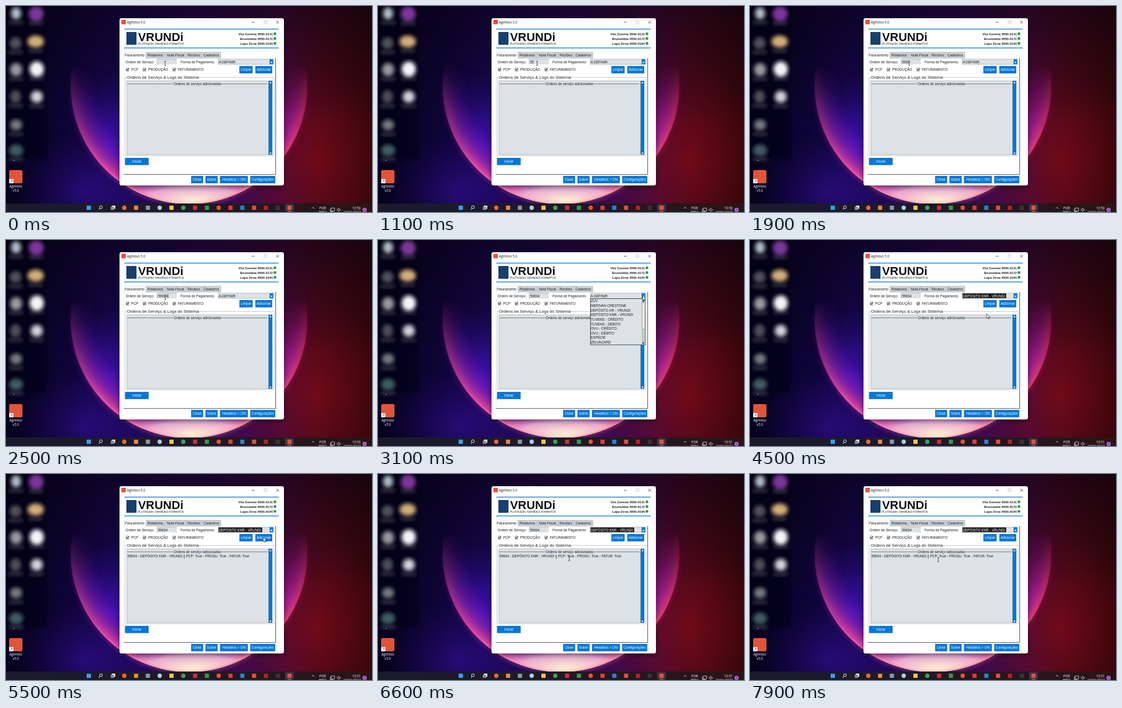
An HTML page that plays this animation: 690x388 px, repeating every 8000 ms.

```html
<!DOCTYPE html>
<html lang="pt-BR">
<head>
<meta charset="utf-8">
<title>Faturamento</title>
<style>
html, body { margin: 0; width: 100%; height: 100%; overflow: hidden; background: #06021a; }
svg { display: block; width: 690px; height: 388px; }
text { font-family: "Liberation Sans", Arial, sans-serif; font-size: 6.5px; fill: #1c1c1c; white-space: pre; }
.ui { font-family: "Open Sans", "Noto Sans", sans-serif; font-size: 6.2px; }
.light { fill: #fff; }
.mid { text-anchor: middle; }
.end { text-anchor: end; }
.bold { font-weight: bold; }
</style>
</head>
<body>
<svg id="stage" viewBox="0 0 690 388" xmlns="http://www.w3.org/2000/svg">
  <defs>
    <linearGradient id="sky">
      <stop offset="0" stop-color="#06021c"/><stop offset=".17" stop-color="#0d0436"/>
      <stop offset=".3" stop-color="#180650"/><stop offset=".55" stop-color="#34085a"/>
      <stop offset=".76" stop-color="#4e0a3a"/><stop offset=".86" stop-color="#4e0818"/>
      <stop offset="1" stop-color="#340608"/>
    </linearGradient>
    <linearGradient id="shade" x2="0" y2="1">
      <stop offset="0" stop-color="#06020f" stop-opacity=".6"/>
      <stop offset=".55" stop-color="#06020f" stop-opacity="0"/>
    </linearGradient>
    <linearGradient id="rim" gradientUnits="userSpaceOnUse" x1="122" y1="0" x2="568" y2="0">
      <stop offset="0" stop-color="#c02c9c"/><stop offset=".2" stop-color="#fa5cac"/>
      <stop offset=".5" stop-color="#ffd8c0"/><stop offset=".8" stop-color="#ff7088"/>
      <stop offset="1" stop-color="#e02858"/>
    </linearGradient>
    <linearGradient id="fade" gradientUnits="userSpaceOnUse" x1="0" y1="110" x2="0" y2="300">
      <stop offset="0" stop-color="#000"/><stop offset=".4" stop-color="#777"/><stop offset="1" stop-color="#fff"/>
    </linearGradient>
    <radialGradient id="crescent" gradientUnits="userSpaceOnUse" cx="345" cy="150" r="223" fx="345" fy="70">
      <stop offset=".78" stop-color="#6a18c8" stop-opacity="0"/>
      <stop offset=".9" stop-color="#a024b4" stop-opacity=".55"/>
      <stop offset="1" stop-color="#f04c98" stop-opacity=".9"/>
    </radialGradient>
    <radialGradient id="violet"><stop offset="0" stop-color="#4c14d0" stop-opacity=".75"/><stop offset="1" stop-color="#3010a0" stop-opacity="0"/></radialGradient>
    <radialGradient id="magenta"><stop offset="0" stop-color="#a01480" stop-opacity=".7"/><stop offset="1" stop-color="#700c60" stop-opacity="0"/></radialGradient>
    <radialGradient id="ember"><stop offset="0" stop-color="#8c0c18" stop-opacity=".55"/><stop offset="1" stop-color="#600810" stop-opacity="0"/></radialGradient>
    <radialGradient id="dawn"><stop offset="0" stop-color="#fff2d4"/><stop offset=".5" stop-color="#f8c0dc" stop-opacity=".85"/><stop offset="1" stop-color="#d060d0" stop-opacity="0"/></radialGradient>
    <linearGradient id="bar"><stop offset=".3" stop-color="#1b1a2c"/><stop offset="1" stop-color="#2a1416"/></linearGradient>
    <mask id="lower"><rect width="690" height="388" fill="url(#fade)"/></mask>
    <clipPath id="planet"><circle cx="345" cy="150" r="223"/></clipPath>
    <filter id="soft" x="-20%" y="-20%" width="140%" height="140%"><feGaussianBlur stdDeviation="5"/></filter>
    <filter id="smudge" x="-20%" y="-20%" width="140%" height="140%"><feGaussianBlur stdDeviation="3"/></filter>
    <filter id="drop" x="-10%" y="-10%" width="120%" height="120%"><feDropShadow dx="0" dy="3" stdDeviation="5" flood-opacity=".45"/></filter>
  </defs>
  <g id="wallpaper">
    <rect width="690" height="388" fill="url(#sky)"/>
    <ellipse cx="150" cy="350" rx="130" ry="110" fill="url(#violet)" opacity=".5"/>
    <ellipse cx="585" cy="290" rx="150" ry="170" fill="url(#ember)"/>
    <g clip-path="url(#planet)">
      <ellipse cx="195" cy="265" rx="110" ry="140" fill="url(#violet)"/>
      <ellipse cx="535" cy="240" rx="90" ry="130" fill="url(#magenta)"/>
    </g>
    <rect width="690" height="388" fill="url(#shade)"/>
    <g mask="url(#lower)" fill="none">
      <circle cx="345" cy="150" r="223" fill="url(#crescent)"/>
      <ellipse cx="355" cy="366" rx="180" ry="50" fill="url(#dawn)" clip-path="url(#planet)"/>
      <circle cx="345" cy="150" r="221" stroke="url(#rim)" stroke-width="7" opacity=".4" filter="url(#soft)"/>
      <circle cx="345" cy="150" r="221.5" stroke="url(#rim)" stroke-width="3" opacity=".85"/>
    </g>
  </g>
  <g id="desktop"></g>
  <g id="taskbar"></g>
  <g id="window"></g>
  <g id="menu"></g>
  <path id="arrow" d="M0 0V8.6L2 6.8 3.4 9.8 4.8 9.1 3.5 6.3H6.2Z" fill="#fff" stroke="#111" stroke-width=".7"/>
  <path id="beam" d="M-1.6 -4H1.6M0 -4V4M-1.6 4H1.6" fill="none" stroke="#222" stroke-width=".8"/>
</svg>
<script>
const LOOP = 8000;
const BLUE = '#0078d7', FIELD = '#dce2e6';
const ORDER = '59634', PAYMENT = 'DEPÓSITO KNR - VRUNDI';
const $ = id => document.getElementById(id);

function add(parent, tag, attrs, content) {
  const node = document.createElementNS('http://www.w3.org/2000/svg', tag);
  for (const key in attrs) node.setAttribute(key, attrs[key]);
  if (content !== undefined) node.textContent = content;
  parent.appendChild(node);
  return node;
}
const box = (g, x, y, width, height, fill, more) => add(g, 'rect', { x, y, width, height, fill, ...more });
const dot = (g, cx, cy, r, fill) => add(g, 'circle', { cx, cy, r, fill });
const line = (g, d, stroke, width = 0.8) => add(g, 'path', { d, stroke, 'stroke-width': width, fill: 'none' });
const label = (g, x, y, str, cls = '', style = '') => add(g, 'text', { x, y, class: cls, style }, str);
const shape = (g, d, fill) => add(g, 'path', { d, fill });

function button(g, x, y, width, height, str) {
  box(g, x + .3, y + .3, width - .6, height - .6, BLUE, { stroke: '#0a62ae', 'stroke-width': .6 });
  label(g, x + width / 2, y + height / 2 + 2.4, str, 'mid light');
}

function drawDesktop(g) {
  const blurred = add(g, 'g', { filter: 'url(#smudge)' });
  box(blurred, -8, -8, 84, 297, '#05030f', { opacity: .55 });
  // Centre, half width, half height, colour
  const icons = [
    [19, 14, 7, 9, '#b0bcc8'], [57, 15, 12, 12, '#7a3499'], [18, 70, 9, 9, '#50505c'], [56, 67, 13, 9, '#d2ae78'],
    [19, 120, 9, 10, '#98989f'], [58, 119, 11, 12, '#f4f4f8'], [18, 171, 8, 10, '#4e4e58'], [58, 171, 9, 9, '#d0d0d8'],
    [19, 224, 9, 8, '#74787e'], [19, 272, 11, 9, '#3d5c62']
  ];
  for (const [x, y, w, h, fill] of icons) {
    add(blurred, 'ellipse', { cx: x, cy: y, rx: w + 1, ry: h + 1, fill });
    box(blurred, x - 12, y + 15, 24, 4, '#8c8c98', { opacity: .35 });
  }
  box(g, 14, 290.5, 2, 1, '#ddd');
  box(g, 6, 309, 25, 25, '#e2543a', { rx: 3 });
  box(g, 6, 326, 8, 8, '#f4f4f4');
  line(g, 'M8 332L12 328M9.5 328H12V330.5', '#2a6ac0');
  label(g, 18.5, 342, 'AgilVexo', 'ui mid light');
  label(g, 18.5, 349.5, 'v5.0', 'ui mid light');
}

function drawTaskbar(g) {
  box(g, 0, 372, 690, 16, 'url(#bar)');
  box(g, 526, 373, 17, 14, '#3a3444', { rx: 2 });
  box(g, 152, 376, 8, 8, '#2fa4ec');
  add(g, 'circle', { cx: 179, cy: 379, r: 2.7, fill: 'none', stroke: '#eee' });
  line(g, 'M177 381L175 384', '#eee', 1);
  box(g, 199.5, 376, 6.5, 6, '#f0f0f0');
  box(g, 197.5, 378, 6.5, 6, '#8c8c94');
  const apps = [
    ['o', '#f0682c'], ['s', '#e8883c'], ['s', '#8b96a4'], ['o', '#a8d4dc'], ['s', '#f4c64c'], ['o', '#3ba25c'],
    ['s', '#c8303c'], ['s', '#2c9c48'], ['o', '#ec5428'], ['s', '#e03c34'], ['s', '#2484d0'], ['s', '#e05038'],
    ['s', '#b8201c'], ['s', '#34343c'], ['s', '#e2543a']
  ];
  apps.forEach(([kind, fill], i) => {
    const x = 223 + i * 22.25;
    if (kind === 'o') dot(g, x, 380, 4.2, fill);
    else box(g, x - 4, 376, 8, 8, fill, { rx: 1 });
  });
  box(g, 531, 386, 7, 1.2, '#e06a8c', { rx: .6 });
  line(g, 'M576.5 381.5L579 379 581.5 381.5', '#eee');
  label(g, 597, 382.5, 'POR', 'ui mid light');
  label(g, 597, 390.5, 'PTB2', 'ui mid light');
  line(g, 'M613 380.5H619.5V386H613ZM611.5 382V387.5H617', '#eee');
  line(g, 'M624.3 382.5H625.5L627.8 380.5V387L625.5 385H624.3Z', '#eee', .7);
  line(g, 'M629 382.5L631.5 385.5M631.5 382.5L629 385.5', '#eee', .6);
  const clock = label(g, 668.5, 382.5, '', 'ui end light');
  label(g, 669, 390.5, '17/01/2022', 'ui end light');
  dot(g, 676, 384, 4, '#b45ce0');
  label(g, 676, 386.2, '2', 'ui mid', 'font-size:5.5px');
  return { clock };
}

function drawHeader(g) {
  box(g, 214, 23, 310, 315, '#fff', { rx: 4, filter: 'url(#drop)' });
  box(g, 217.5, 26, 8.5, 8.5, '#e2543a', { rx: 1 });
  label(g, 228, 33, 'AgilVexo 5.0', 'ui');
  line(g, 'M463.5 30.5H468.5M509.5 28L514.5 33M514.5 28L509.5 33', '#222');
  line(g, 'M486.5 28H491.5V33H486.5Z', '#bbb');
  line(g, 'M223 43.5H514M223 79H514', '#1c7cd4', 1.5);
  box(g, 227, 49, 19, 24, '#17406e');
  label(g, 249, 66, 'VRUNDi', 'bold', 'font-size:22.3px;fill:#111');
  label(g, 249, 72.5, 'PLOTAGEM | GRANDES FORMATOS', '', 'font-size:5.05px');
  ['Vila Zurema 5550.0131', 'Brumelália 5550.0172', 'Lapa Zirna 5550.0194'].forEach((str, i) => {
    label(g, 503, 54.7 + i * 9, str, 'bold end', 'font-size:6.1px');
    dot(g, 507, 52.3 + i * 9, 2.6, '#2c9c40');
  });
}

function drawWindow(g) {
  drawHeader(g);
  line(g, 'M222.5 98V317.3', '#e0e4e6');
  line(g, 'M508.4 98V317.3H222', '#444', 1);
  const tabs = [[264, 35, 'Relatorios'], [300, 39, 'Nota Fiscal'], [340, 28, 'Recibos'], [369, 36, 'Cadastros']];
  label(g, 224, 95, 'Faturamento');
  line(g, 'M222.5 98V87H263', '#d8dcde');
  for (const [x, width, str] of tabs) {
    box(g, x, 87, width, 11, '#ccd2d8', { stroke: '#8a9096', 'stroke-width': .5 });
    label(g, x + width / 2, 95, str, 'mid');
  }

  label(g, 225.3, 107.8, 'Ordem de Serviço:');
  box(g, 285, 100, 37, 10, FIELD);
  line(g, 'M285 110V100H322', '#9aa0a4');
  const order = label(g, 286.5, 107.8, '');
  const caret = box(g, 0, 101.5, .8, 7.5, '#111');
  label(g, 329, 107.8, 'Forma de Pagamento:');
  box(g, 400, 100, 104, 10, FIELD, { stroke: '#888', 'stroke-width': .5 });
  const highlight = box(g, 400.5, 100.7, 82.5, 8.8, '#151515');
  const payment = label(g, 401, 107.8, '');
  box(g, 497, 100.3, 7, 9.5, BLUE);
  shape(g, 'M498.3 105H502.7L500.5 108Z', '#fff');

  [[226, 'PCP'], [258, 'PRODUÇÃO'], [314, 'FATURAMENTO']].forEach(([x, str]) => {
    box(g, x + .4, 117, 5.4, 5.4, '#fff', { stroke: '#555', 'stroke-width': .7 });
    line(g, `M${x + 1.4} 119.4L${x + 2.7} 121 ${x + 5} 117.8`, '#111', 1.1);
    label(g, x + 10, 122.3, str);
  });
  button(g, 440, 113, 25, 14, 'Limpar');
  button(g, 470, 113, 32, 14, 'Adicionar');

  box(g, 225, 134.5, 280.5, 147.5, 'none', { stroke: '#b4b8ba', 'stroke-width': .8 });
  box(g, 227, 130, 137, 9, '#fff');
  label(g, 228, 137.3, 'Ordens de Serviço & Logs do Sistema', '', 'font-size:8px');
  box(g, 228, 141, 267, 139, FIELD, { stroke: '#9aa0a4', 'stroke-width': .7 });
  box(g, 495.4, 141, 6.5, 139, BLUE, { stroke: '#0a62ae', 'stroke-width': .6 });
  shape(g, 'M496.6 145.5H500.7L498.6 142.5ZM496.6 276H500.7L498.6 279Z', '#fff');
  line(g, 'M495.5 147H502M495.5 274.5H502', '#0a4f8c', .6);
  line(g, 'M229 146.7H316M405.5 146.7H492.5', '#444', .7);
  label(g, 360.8, 148.6, 'Ordens de serviço adicionadas', 'mid');
  const log = label(g, 229, 156.6, `${ORDER} - ${PAYMENT} || PCP: True - PRODU: True - FATUR: True`);

  button(g, 224.5, 286, 44.5, 13.5, 'Iniciar');
  button(g, 349, 320, 22.5, 14, 'Close');
  button(g, 376, 320, 23, 14, 'Sobre');
  button(g, 403.5, 320, 52.5, 14, 'Headless = ON');
  button(g, 460.5, 320, 47, 14, 'Configurações');
  return { order, caret, highlight, payment, log };
}

function drawMenu(g) {
  box(g, 400.4, 110.4, 103.5, 87, FIELD, { stroke: '#222', 'stroke-width': .8 });
  const select = box(g, 401, 0, 95.5, 8.6, '#151515');
  const items = ['ZUV', 'MERIVAN CRESTONE', 'DEPÓSITO KR - VRUNDI', PAYMENT, 'TUVENS - CRÉDITO',
    'TUVENS - DÉBITO', 'OVU - CRÉDITO', 'OVU - DÉBITO', 'ESPÉCIE', 'ZELVACARD']
    .map((str, i) => label(g, 401, 117.4 + i * 8.63, str));
  box(g, 497, 111, 6.4, 86, '#c4c8ca');
  box(g, 497.3, 118, 5.8, 50, '#e6e8ea', { stroke: '#777', 'stroke-width': .6 });
  shape(g, 'M498.2 116H502.2L500.2 113ZM498.2 193H502.2L500.2 196Z', '#222');
  return { select, items };
}

drawDesktop($('desktop'));
const ui = { ...drawTaskbar($('taskbar')), ...drawWindow($('window')), ...drawMenu($('menu')) };

const keyTimes = [700, 1000, 1500, 1900, 2300];
const openAt = 3100, pickAt = 4000, addAt = 5200, minuteAt = 3000;
// Pointer stops: time, x, y
const path = [
  [0, 300, 108], [2600, 300, 108], [3000, 499, 105], [3200, 499, 105], [3750, 465, 145],
  [4050, 465, 145], [4400, 446, 139], [4600, 446, 139], [5000, 485, 119], [5900, 485, 119],
  [6700, 355, 161], [LOOP, 355, 161]
];

function pointerAt(t) {
  const i = path.findIndex(stop => stop[0] > t);
  const [t0, x0, y0] = path[i - 1], [t1, x1, y1] = path[i];
  const u = (t - t0) / (t1 - t0), ease = u * u * (3 - 2 * u);
  return [x0 + (x1 - x0) * ease, y0 + (y1 - y0) * ease];
}
const show = (node, on) => node.setAttribute('visibility', on ? 'visible' : 'hidden');
const inside = (x, y, l, t, r, b) => x > l && x < r && y > t && y < b;

function render(t) {
  const typed = keyTimes.filter(k => t >= k).length;
  const open = t >= openAt && t < pickAt, picked = t >= pickAt;
  const [x, y] = pointerAt(t);

  ui.clock.textContent = t < minuteAt ? '10:50' : '10:51';
  ui.order.textContent = ORDER.slice(0, typed);
  ui.caret.setAttribute('x', 286.8 + typed * 3.615);
  show(ui.caret, t < openAt && t % 900 >= 600);
  ui.payment.textContent = picked ? PAYMENT : 'A DEFINIR';
  ui.payment.style.fill = picked ? '#fff' : '';
  show(ui.highlight, picked);
  show(ui.log, t >= addAt);

  $('menu').setAttribute('display', open ? 'inline' : 'none');
  const row = t < 3250 ? -1 : Math.max(0, Math.min(3, Math.floor((y - 111) / 8.63)));
  show(ui.select, open && row >= 0);
  ui.select.setAttribute('y', 110.9 + row * 8.63);
  ui.items.forEach((item, i) => { item.style.fill = i === row ? '#fff' : ''; });

  const overText = !open && (inside(x, y, 285, 100, 322, 110) || inside(x, y, 228, 141, 495, 280));
  show($('beam'), overText);
  show($('arrow'), !overText);
  for (const id of ['beam', 'arrow']) $(id).setAttribute('transform', `translate(${x} ${y})`);
}

function tick() {
  render(performance.now() % LOOP);
  requestAnimationFrame(tick);
}
tick();
</script>
</body>
</html>
```
